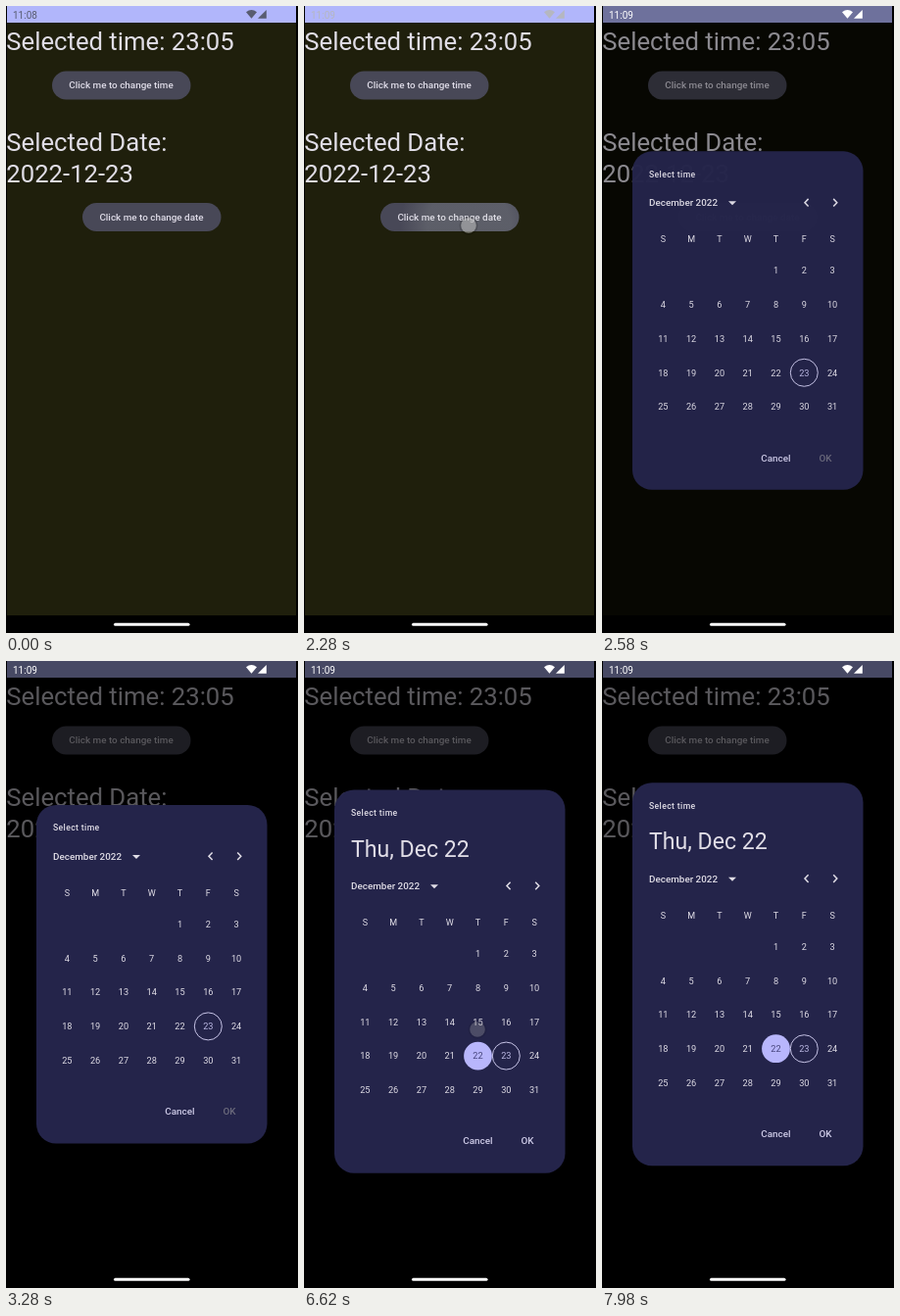
An HTML page with a canvas for the animation above (8 s loop, 298 px wide and 640 px high).

```html
<!DOCTYPE html>
<html lang="en">
<head>
<meta charset="utf-8">
<title>Date picker</title>
<style>
  html, body { margin: 0; width: 100%; height: 100%; overflow: hidden; background: #000; }
  canvas { display: block; width: 298px; height: 640px; }
</style>
</head>
<body>
<canvas></canvas>
<script>
const WIDTH = 298, HEIGHT = 640, LOOP = 8000;
const TEXT = '#e0dde6', PRIMARY = '#b8b6fc';
const canvas = document.querySelector('canvas');
const ctx = canvas.getContext('2d');
const ratio = window.devicePixelRatio || 1;
canvas.width = WIDTH * ratio;
canvas.height = HEIGHT * ratio;

const progress = (t, start, duration) => Math.min(1, Math.max(0, (t - start) / duration));
const easeOut = (p, power) => 1 - (1 - p) ** power;
const mix = (a, b, p) => `rgb(${a.map((v, i) => Math.round(v + (b[i] - v) * p))})`;

// y is the vertical centre of the capitals
function text(str, x, y, size, { color = TEXT, weight = 400, align = 'left', spacing = 0 } = {}) {
  ctx.font = `${weight} ${size}px Roboto, sans-serif`;
  ctx.letterSpacing = spacing + 'px';
  ctx.textAlign = align;
  ctx.fillStyle = color;
  ctx.fillText(str, x, y + size * 0.356);
}

function rect(x, y, w, h, color, radius = 0) {
  ctx.fillStyle = color;
  ctx.beginPath();
  ctx.roundRect(x, y, w, h, radius);
  ctx.fill();
}

function circle(x, y, r, color) {
  ctx.fillStyle = color;
  ctx.beginPath();
  ctx.arc(x, y, r, 0, Math.PI * 2);
  ctx.fill();
}

function polygon(points, color) {
  ctx.fillStyle = color;
  ctx.beginPath();
  points.forEach(([x, y]) => ctx.lineTo(x, y));
  ctx.fill();
}

function button(label, x, y) {
  rect(x, y, 141.5, 29, '#484857', 14.5);
  text(label, x + 70.5, y + 14.3, 9.9, { weight: 500, align: 'center', color: '#dfdce8' });
}

function ripple(t) {
  if (t < 1660 || t > 2700) return;
  ctx.save();
  ctx.beginPath();
  ctx.roundRect(78, 201, 141.5, 29, 14.5);
  ctx.clip();
  ctx.globalAlpha = 0.13 * progress(t, 1660, 150) * (1 - progress(t, 2300, 400));
  const radius = 14 + 56 * progress(t, 1660, 620);
  const glow = ctx.createRadialGradient(168, 224, radius * 0.6, 168, 224, radius);
  glow.addColorStop(0, '#e6f4dc');
  glow.addColorStop(1, '#e6f4dc00');
  circle(168, 224, radius, glow);
  ctx.restore();
}

function drawApp(t, dim) {
  rect(1, 0, 295, 622, mix([31, 31, 12], [0, 0, 0], dim));
  rect(1, 0, 295, 17, '#b1b6fb');
  text('Selected time: 23:05', 0.3, 35.8, 25.7);
  button('Click me to change time', 47, 66.5);
  text('Selected Date:', 0.3, 139, 25.7);
  text('2022-12-23', 0.3, 171, 25.7);
  button('Click me to change date', 78, 201);
  ripple(t);
  rect(1, 0, 295, 622, `rgba(0,0,0,${0.6 * dim})`);
}

function drawSystem(t) {
  const color = mix([88, 92, 112], [255, 255, 255], progress(t, 2130, 270));
  text(t < 1430 ? '11:08' : '11:09', 7, 9, 10, { color });
  ctx.fillStyle = color;
  ctx.beginPath();
  ctx.moveTo(250.5, 12.8);
  ctx.lineTo(245, 6.2);
  ctx.quadraticCurveTo(250.5, 2, 256, 6.2);
  ctx.fill();
  polygon([[257, 12.8], [265.8, 12.8], [265.8, 4]], color);
  rect(110, 629.8, 77.5, 3, '#fff', 1.5);
}

function chevron(x, y, direction) {
  ctx.strokeStyle = TEXT;
  ctx.lineWidth = 1.5;
  ctx.beginPath();
  ctx.moveTo(x - 1.8 * direction, y - 3.8);
  ctx.lineTo(x + 1.8 * direction, y);
  ctx.lineTo(x - 1.8 * direction, y + 3.8);
  ctx.stroke();
}

function drawCalendar(top, selected) {
  const column = i => 62.3 + i * 28.8;
  const centered = { align: 'center' };
  text('December 2022', 48, top + 52.5, 9.9, { weight: 500 });
  polygon([[129, top + 51], [137, top + 51], [133, top + 55]], TEXT);
  chevron(208.8, top + 52.3, -1);
  chevron(238, top + 52.3, 1);
  [...'SMTWTFS'].forEach((name, i) => text(name, column(i), top + 89.7, 9, centered));

  for (let day = 1; day <= 31; day++) {
    const cell = day + 3;
    const x = column(cell % 7);
    const y = top + 121.5 + Math.floor(cell / 7) * 34.7;
    const picked = selected && day === 22;
    if (picked) circle(x, y + 0.3, 14.4, PRIMARY);
    if (day === 23) {
      ctx.strokeStyle = '#c6c3e6';
      ctx.lineWidth = 1;
      ctx.beginPath();
      ctx.arc(x, y + 0.3, 14, 0, Math.PI * 2);
      ctx.stroke();
    }
    const color = picked ? '#45437c' : day === 23 ? '#bcb9e4' : TEXT;
    text(day, x, y + 0.3, 9.2, { align: 'center', color });
  }

  const action = { weight: 500, align: 'center', color: '#cfcce8' };
  text('Cancel', 177.4, top + 312.7, 9.9, action);
  text('OK', 228, top + 312.7, 9.9, selected ? action : { ...action, color: '#6c6b7c' });
}

function drawDialog(t) {
  const enter = progress(t, 2400, 300);
  if (enter === 0) return;
  const selected = t >= 6420;
  const headline = selected ? 45.6 : 0;
  const rise = 22.8 * easeOut(progress(t, 6420, 640), 3);
  const top = 147 + 22 * (1 - easeOut(enter, 3)) - rise;

  ctx.save();
  ctx.globalAlpha = easeOut(enter, 4);
  rect(31, top, 235.5, 345.5 + headline, '#24244a', 20);
  text('Select time', 48, top + 23.4, 8.67, { weight: 500, spacing: 0.36 });
  if (selected) text('Thu, Dec 22', 48, top + 60, 23.1);
  drawCalendar(top + headline, selected);
  ctx.restore();
}

function drawTouch(t, x, y, down, up, fade) {
  if (t < down) return;
  ctx.save();
  ctx.globalAlpha = 0.78 * (1 - progress(t, up, fade));
  circle(x, y, 9.5, 'rgba(0,0,0,.3)');
  circle(x, y, 7.8, '#d2d2d2');
  ctx.restore();
}

function draw(t) {
  ctx.setTransform(ratio, 0, 0, ratio, 0, 0);
  rect(0, 0, WIDTH, HEIGHT, '#000');
  drawApp(t, easeOut(progress(t, 2320, 660), 2));
  drawDialog(t);
  drawSystem(t);
  drawTouch(t, 168, 224, 1620, 2180, 300);
  drawTouch(t, 177, 376, 6200, 6400, 320);
}

const start = performance.now();
function frame() {
  draw((performance.now() - start) % LOOP);
  requestAnimationFrame(frame);
}
frame();
</script>
</body>
</html>
```
